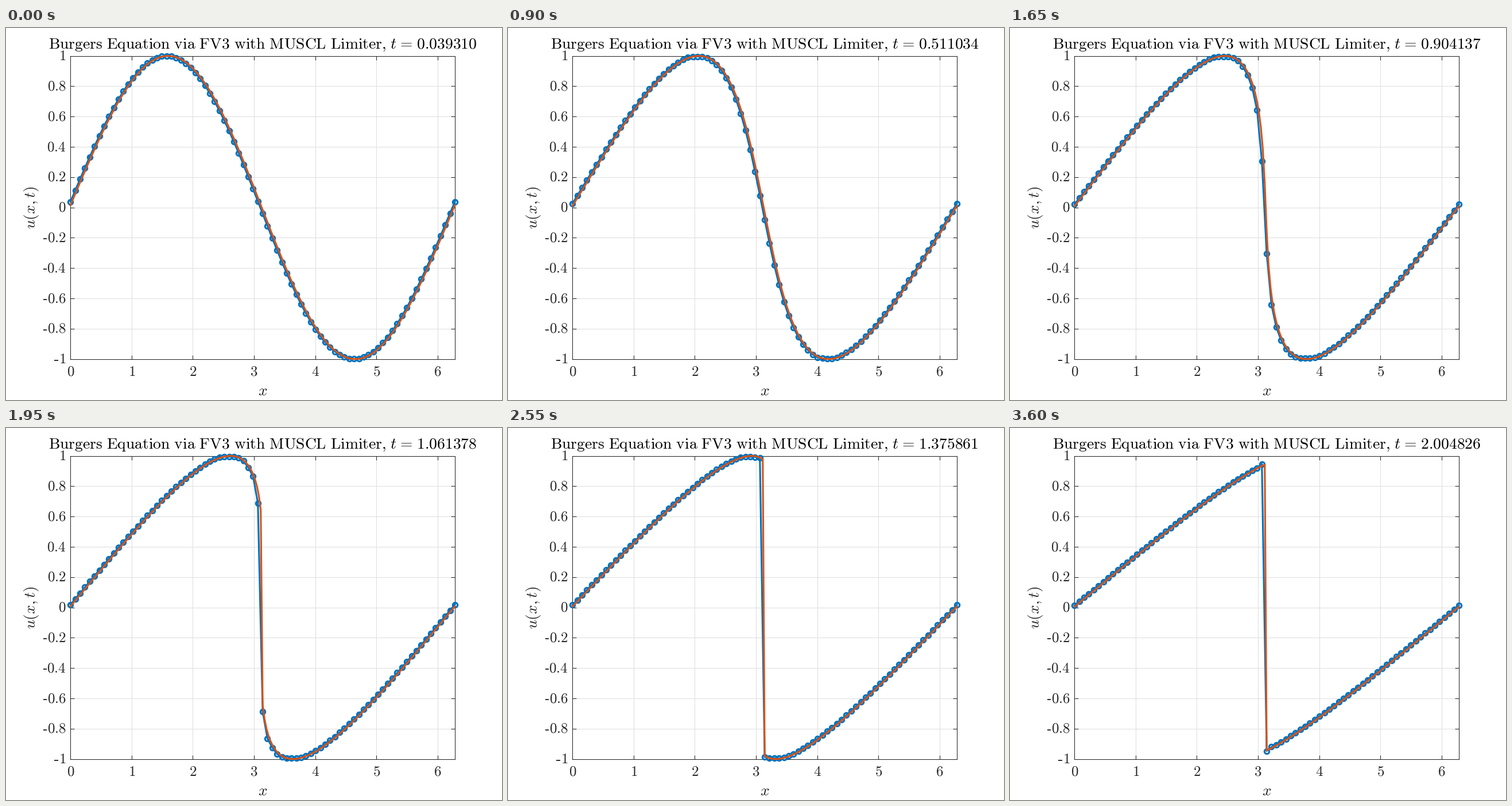
Animation of 864 by 648 pixels, one loop 3.75 s. Source, as a matplotlib script:

```python
import numpy as np
import matplotlib.pyplot as plt
from matplotlib.animation import FuncAnimation

W, H, DPI = 864, 648, 150
FRAMES, INTERVAL = 25, 150
BLUE, ORANGE, INK, GRID = "#0072BD", "#D95319", "#262626", "#DFDFDF"
CELLS, FINE = 80, 200
DX = 2 * np.pi / CELLS
LEFT, RIGHT, TOP, BOTTOM = 112.32, 781.92, 48.6, 576.72

plt.rcParams["mathtext.fontset"] = "cm"


def limited(a, b):
    """Third-order limited slope, weighted towards b."""
    s = np.sign(a)
    size = np.minimum(np.minimum(2 * abs(a), 2 * abs(b)), abs(a + 2 * b) / 3)
    return np.where(a * b > 0, s * size, 0)


def rate(u):
    a, b = u - np.roll(u, 1), np.roll(u, -1) - u
    ul = u + limited(a, b) / 2
    ur = np.roll(u - limited(b, a) / 2, -1)
    flux = np.maximum(np.maximum(ul, 0) ** 2, np.minimum(ur, 0) ** 2) / 2
    return (np.roll(flux, 1) - flux) / DX


def advance(u, dt):
    a = u + dt * rate(u)
    b = 0.75 * u + 0.25 * (a + dt * rate(a))
    return u / 3 + 2 / 3 * (b + dt * rate(b))


def exact(x, t):
    """Entropy solution for sin(x), by bisection along characteristics."""
    x = np.mod(x, 2 * np.pi)
    sign = np.where(x < np.pi, 1, -1)
    y = np.where(x < np.pi, x, 2 * np.pi - x)
    lo, hi = np.zeros_like(y), np.full_like(y, np.pi)
    for _ in range(45):
        mid = (lo + hi) / 2
        low = mid + t * np.sin(mid) < y
        lo, hi = np.where(low, mid, lo), np.where(low, hi, mid)
    return sign * np.sin(lo)


edges = np.arange(CELLS + 1) * DX
u = -np.diff(np.cos(edges)) / DX
DT = 0.5 * DX / abs(u).max()
states = [u]
for _ in range(51):
    states.append(advance(states[-1], DT))

fig = plt.figure(figsize=(W / DPI, H / DPI), dpi=DPI, facecolor="white")
ax = fig.add_axes([LEFT / W, 1 - BOTTOM / H, (RIGHT - LEFT) / W, (BOTTOM - TOP) / H])
ax.set_xlim(0, 2 * np.pi)
ax.set_ylim(-1, 1)
ax.set_xticks(range(7))
ax.set_yticks(np.arange(-5, 6) / 5)
ax.tick_params(direction="in", length=3.2, width=0.5, color=INK, top=True,
               right=True, labelbottom=False, labelleft=False)
ax.grid(color=GRID, lw=0.5)
ax.set_axisbelow(True)
for spine in ax.spines.values():
    spine.set(color=INK, linewidth=0.5)


def label(x, y, s, size=12, ha="center", **kw):
    return fig.text(x / W, 1 - y / H, s, fontsize=size, color=kw.pop("color", INK),
                    ha=ha, va="baseline", **kw)


for k in range(7):
    label(LEFT + k / (2 * np.pi) * (RIGHT - LEFT), 605.5, rf"$\mathrm{{{k}}}$")
for k in range(-5, 6):
    y = (TOP + BOTTOM) / 2 - k / 10 * (BOTTOM - TOP)
    text = f"{abs(k) / 5:g}"
    label(104.5, y + 7, rf"$\mathrm{{{text}}}$", ha="right")
    if k < 0:
        x = 104.5 - (12.5 if k == -5 else 32)
        fig.add_artist(plt.Line2D([(x - 8) / W, (x - 1.2) / W], [1 - (y + 1.8) / H] * 2,
                                  color=INK, lw=0.9, solid_capstyle="butt"))
label(447.1, 640, "$x$", 13.2)
label(51, 312.5, "$u(x,t)$", 13.2, rotation=90, rotation_mode="anchor")
title = label(74, 35.3, "", 13.22, "left", color="black")

numeric, = ax.plot([], [], "o-", color=BLUE, lw=1.5, ms=4.0, mfc="none", mew=1.5,
                   clip_on=False, zorder=3)
truth, = ax.plot([], [], color=ORANGE, lw=1.5, clip_on=False, zorder=4)
fine = np.linspace(0, 2 * np.pi, FINE + 1)
HEAD = (r"$\mathrm{Burgers\ Equation\ via\ FV3\ with\ MUSCL\ Limiter},"
        r"\hspace{0.133}t\hspace{0.09}=\hspace{0.09}")


def draw(i):
    step = 2 * (i + (i >= 20)) + 1
    t = step * DT
    u = states[step]
    numeric.set_data(edges, np.append(u, u[0]))
    truth.set_data(fine, exact(fine + np.pi / FINE, t))
    title.set_text(HEAD + rf"\mathrm{{{t:.6f}}}$")
    return numeric, truth, title


anim = FuncAnimation(fig, draw, frames=FRAMES, interval=INTERVAL, repeat=True)
plt.show()
```
